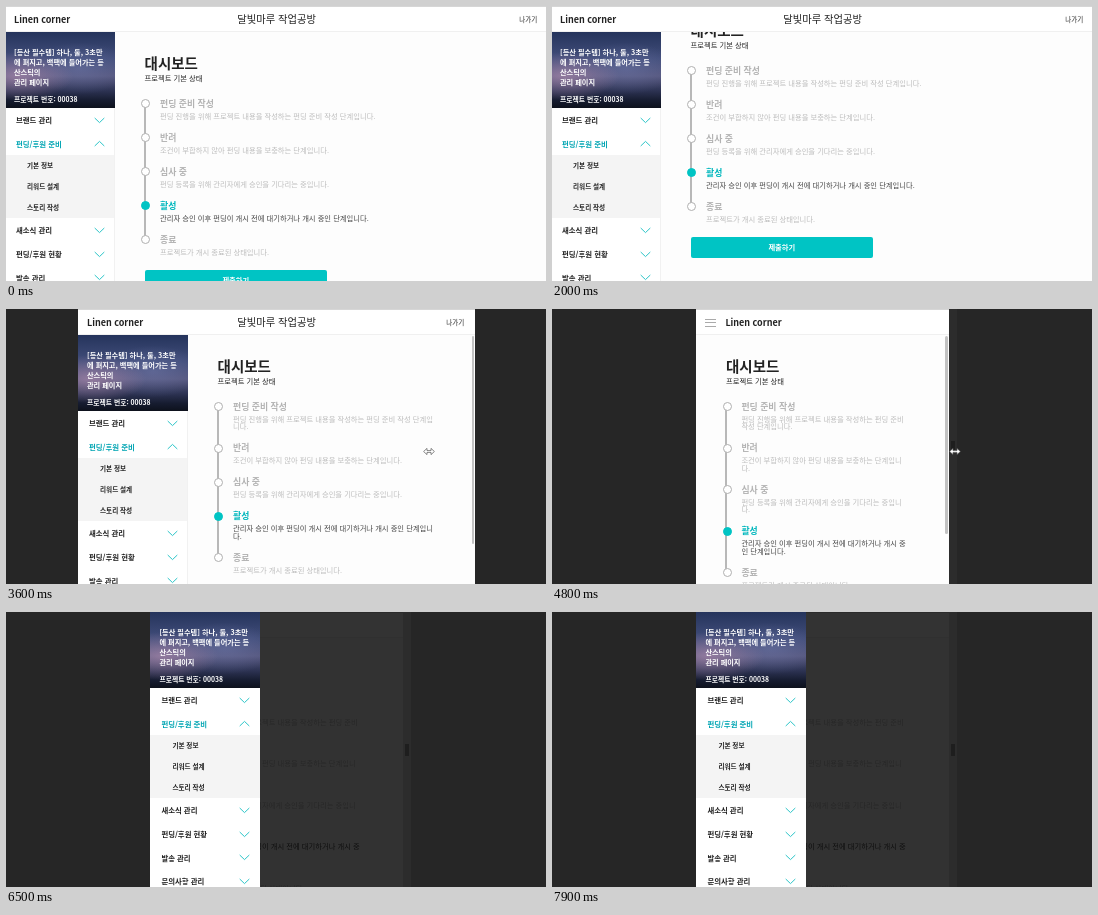
Write an HTML page that moves like this. It is 540 by 275 pixels and loops after 8 s.

```html
<!DOCTYPE html>
<html lang="ko">
<head>
<meta charset="utf-8">
<title>대시보드</title>
<style>
* { box-sizing: border-box; }
html, body { margin: 0; width: 100%; height: 100%; overflow: hidden; }
body { position: relative; background: #262626; color: #222; font: 7.32px "Noto Sans CJK KR", "Noto Sans CJK", "Noto Sans", sans-serif; white-space: nowrap; }
h1, h2, p, ul, ol { margin: 0; padding: 0; list-style: none; }
#grip { position: absolute; top: 0; width: 8px; height: 275px; background: #2c2c2c; }
#grip::after { content: ""; position: absolute; left: 2px; top: 132px; width: 4px; height: 12px; background: #1e1e1e; }
#win { position: absolute; top: 0; height: 275px; overflow: hidden; background: #fdfdfd; }

header { position: absolute; z-index: 2; inset: 0 0 auto; height: 26px; line-height: 26px; background: #fff; box-shadow: inset 0 1px #d6d6d6, inset 0 -1px #f0f0f0; }
.brand { position: absolute; left: 9px; top: .8px; font-size: 9px; font-weight: 700; }
.shop { text-align: center; font-size: 10.3px; }
.exit { position: absolute; right: 11px; top: 0; font-size: 6.5px; }
.burger { display: none; position: absolute; left: 8.6px; top: 9.5px; width: 11px; height: 8px; border: solid #aaa; border-width: 1px 0; }
.burger::after { content: ""; position: absolute; top: 2.5px; width: 100%; height: 1px; background: #aaa; }

aside { position: absolute; z-index: 1; left: 0; top: 26px; width: 110px; height: 275px; background: #fff; border-right: 1px solid #f1f1f1; font-size: 7.4px; font-weight: 700; }
.photo { width: 110px; height: 76px; padding: 15.4px 9px 0; color: #fff; font-size: 7.2px; line-height: 10px;
  background: radial-gradient(ellipse 55px 24px at 12% 58%, rgba(186, 146, 180, .6), transparent),
    radial-gradient(ellipse 50px 26px at 68% 48%, rgba(110, 120, 170, .5), transparent),
    linear-gradient(#25345c, #414d7a 35%, #57587f 58%, #2f3556 76%, #161c30 90%, #0d111c); }
.photo p { margin-top: 6.8px; font-size: 6.8px; }
.row { position: relative; height: 23.7px; padding-left: 11px; line-height: 23.2px; }
.row.on { color: #00a5b3; }
.row svg { position: absolute; left: 88.5px; top: 8.5px; width: 11px; height: 7px; fill: none; stroke: #2cc5c8; }
.row.on svg { transform: scaleY(-1); }
.sub { height: 63px; background: #f4f4f4; font-size: 6.6px; line-height: 20.8px; }
.sub li { height: 21px; padding-left: 22px; }

main { position: absolute; left: 110px; right: 0; top: 26px; padding: 0 40px 22px 29.6px; }
h1 { padding-top: 19.5px; height: 41px; font-size: 14.5px; line-height: 22px; }
.lead { height: 24.7px; line-height: 10px; }
ol li { position: relative; padding: 0 0 11.5px 15.4px; color: #b3b3b3; }
ol h2 { font-size: 8.9px; line-height: 11.5px; height: 15px; font-weight: 700; }
ol p { line-height: 7.5px; white-space: normal; color: #bcbcbc; }
ol li::before { content: ""; position: absolute; left: -.8px; top: 5px; width: 2px; height: 100%; background: #b8b8b8; }
ol li:last-child::before { display: none; }
ol li::after { content: ""; position: absolute; left: -3.3px; top: 1.5px; width: 7px; height: 7px; border: 1.5px solid #b0b0b0; border-radius: 50%; background: #fff; }
ol .on h2 { color: #00b7bd; }
ol .on p { color: #444; }
ol .on::after { border-color: #00c4c4; background: #00c4c4; }
.send { width: 182.5px; height: 21px; margin-top: 2.5px; border-radius: 2px; background: #00c4c4; color: #fff; font-weight: 700; line-height: 20.5px; text-align: center; }

#thumb { position: absolute; right: 1px; top: 27px; width: 2.4px; border-radius: 2px; background: #c2c2c2; }
#shade { position: absolute; z-index: 3; inset: 0; background: #000; }
#cursor { position: absolute; top: 138px; width: 12px; height: 9px; margin-left: -6px; fill: #fff; stroke: #555; stroke-width: .7; }

.narrow .shop, .narrow .exit { display: none; }
.narrow .burger { display: block; }
.narrow .brand { left: 29px; }
.narrow aside { z-index: 4; top: 0; border: 0; }
.narrow main { left: 0; }
</style>
</head>
<body>
<div id="grip"></div>
<div id="win">
  <header>
    <i class="burger"></i>
    <div class="brand">Linen corner</div>
    <div class="shop">달빛마루 작업공방</div>
    <div class="exit">나가기</div>
  </header>
  <aside id="menu">
    <div class="photo">[등산 필수템] 하나, 둘, 3초만<br>에 펴지고, 백팩에 들어가는 등<br>산스틱의<br>관리 페이지<p>프로젝트 번호: 00038</p></div>
  </aside>
  <main id="page">
    <h1>대시보드</h1>
    <p class="lead">프로젝트 기본 상태</p>
    <ol>
      <li><h2>펀딩 준비 작성</h2><p>펀딩 진행을 위해 프로젝트 내용을 작성하는 펀딩 준비 작성 단계입니다.</p></li>
      <li><h2>반려</h2><p>조건이 부합하지 않아 펀딩 내용을 보충하는 단계입니다.</p></li>
      <li><h2>심사 중</h2><p>펀딩 등록을 위해 관리자에게 승인을 기다리는 중입니다.</p></li>
      <li class="on"><h2>활성</h2><p>관리자 승인 이후 펀딩이 개시 전에 대기하거나 개시 중인 단계입니다.</p></li>
      <li><h2>종료</h2><p>프로젝트가 개시 종료된 상태입니다.</p></li>
    </ol>
    <div class="send">제출하기</div>
  </main>
  <div id="thumb"></div>
  <div id="shade"></div>
</div>
<svg id="cursor" viewBox="0 0 12 9"><path d="M.6 4.5 4 1.4v2.2h4V1.4l3.4 3.1L8 7.6V5.4H4v2.2z"/></svg>
<script>
const LOOP = 8000, STEP = 100, CENTER = 270.6, VIEW = 248, BREAK = 384, MENU = 110;
const $ = id => document.getElementById(id);
const win = $('win'), grip = $('grip'), menu = $('menu'), page = $('page');
const thumb = $('thumb'), shade = $('shade'), cursor = $('cursor');

const row = (name, on = '') =>
  `<div class="row ${on}">${name}<svg viewBox="0 0 11 7"><path d="M.7 1 5.5 5.6 10.3 1"/></svg></div>`;
const sub = ['기본 정보', '리워드 설계', '스토리 작성'].map(s => `<li>${s}</li>`).join('');
menu.insertAdjacentHTML('beforeend',
  row('브랜드 관리') + row('펀딩/후원 준비', 'on') + `<ul class="sub">${sub}</ul>` +
  ['새소식 관리', '펀딩/후원 현황', '발송 관리', '문의사항 관리'].map(s => row(s)).join(''));

// Tracks hold [time, value] pairs, linear in between.
const LEFT = [[2900, -1], [3000, 3], [3600, 72], [3700, 97], [3800, 116], [4100, 129], [4400, 129], [4800, 144.4]];
const SCROLL = [[1100, 0], [1300, 33], [1400, 26], [1600, 0], [1800, 0], [2000, 33], [2100, 0]];
const POINTER = [[2400, 528], [2500, 532], [2600, 546], [2900, 546], [3600, 423], [4100, 418], [4400, 418], [4800, 403]];
const OPEN = [[5600, 0], [5700, 45], [5800, 95], [5900, 110], [6600, 110], [6700, 100], [6800, 55], [6900, 14], [7000, 0],
  [7500, 0], [7600, 14], [7700, 60], [7800, 100], [7900, 110]];
const SHADE = [[5600, 0], [5700, .8], [6800, .8], [7100, 0], [7500, 0], [7700, .8]];

function at(track, t) {
  const i = track.findIndex(k => k[0] > t);
  if (i === 0) return track[0][1];
  if (i < 0) return track[track.length - 1][1];
  const [t0, a] = track[i - 1], [t1, b] = track[i];
  return a + (b - a) * (t - t0) / (t1 - t0);
}

const show = (el, on) => { el.style.visibility = on ? 'visible' : 'hidden'; };

function draw(now) {
  const t = Math.floor(now % LOOP / STEP) * STEP;
  const left = at(LEFT, t), width = 2 * (CENTER - left), narrow = width < BREAK;

  win.style.left = left + 'px';
  win.style.width = width + 'px';
  win.classList.toggle('narrow', narrow);
  grip.style.left = left + width + 'px';
  show(grip, narrow);

  page.style.transform = `translateY(${-at(SCROLL, t)}px)`;
  menu.style.transform = narrow ? `translateX(${at(OPEN, t) - MENU}px)` : 'none';
  shade.style.opacity = at(SHADE, t);

  thumb.style.height = VIEW * VIEW / page.offsetHeight + 'px';
  show(thumb, t >= 3000 && t < 5300);
  cursor.style.left = at(POINTER, t) + 'px';
  show(cursor, t >= 2500 && t < 5000);
  requestAnimationFrame(draw);
}
draw(performance.now());
</script>
</body>
</html>
```
